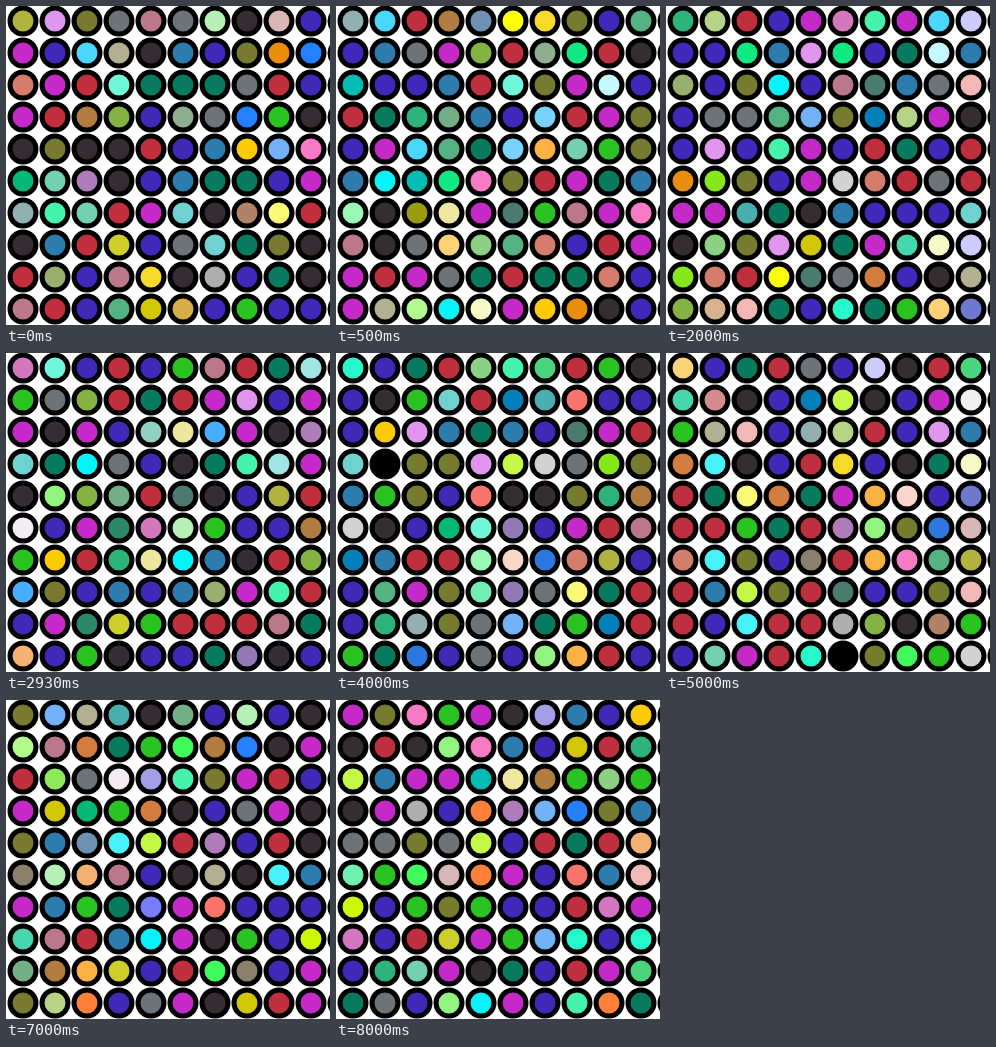
Write an HTML page that moves like this. It is 324x319 px and loops after 8500 ms.

```html
<!DOCTYPE html>
<html lang="en">
<head>
<meta charset="utf-8">
<title>Dots</title>
<style>
html, body { margin: 0; width: 100%; height: 100%; overflow: hidden; background: #fff; }
svg { display: block; width: 100vw; height: 100vh; }
circle { stroke: #000; stroke-width: 5; }
</style>
</head>
<body>
<svg id="stage" viewBox="0 0 324 319" preserveAspectRatio="none"></svg>
<script>
const LOOP = 8500, COLS = 10, ROWS = 10, PITCH = 32, RADIUS = 13;
const steps = [0, 500, 1030, 1500, 2000, 2500, 2930, 3500, 4000,
  4500, 5000, 5500, 6000, 6500, 7000, 7500, 8000];

// Frequent colours with their share of the dots in percent
const common = [
  ['#4029b8', 13], ['#c02f3d', 10], ['#c529c8', 9], ['#362d32', 8],
  ['#777a2f', 5], ['#087a5f', 5], ['#2bc322', 5], ['#6c7379', 3], ['#2c7dad', 3]
];

const rare = (
  '#4b7a70 #10e883 #f4b272 #cccdfa #9179b5 #fbfa78 #d8b6b6 #f7d929 #b7f0b6 ' +
  '#4ad8ff #c4f8fc #0480b8 #2d78df #70f0b0 #d27d3d #8b806e #2cd2c5 #48aeff ' +
  '#f2b8b8 #41fb5d #999b10 #4ad47e #288868 #78d2ff #ccf805 #ea8d0c #98f8b6 ' +
  '#2580ff #70d2d0 #ae7db9 #f97ac6 #aeaeae #26f8cc #f9746b #90f47e #b7d385 ' +
  '#73b2f8 #73d0b0 #b08268 #e095ee #b0b43f #04bab4 #8bd083 #b2b092 #d6ae49 ' +
  '#fccb05 #04abd8 #a1e5e6 #d378bf #787cf8 #46f3ad #d2c705 #b17c3f #92d0c1 ' +
  '#4aaeae #bb788b #cdce2a #eee7a0 #70f8d8 #46d6af #05f4fb #a39fe7 #6c79ce ' +
  '#d48c90 #2db47d #f0eef0 #6e90b2 #47f3fb #f7fac6 #d3d3d3 #c4f846 #86e819 ' +
  '#85b343 #fbd276 #f4ebf0 #d7b28e #8fe858 #04b877 #92afb2 #d47d6c #fdb143 ' +
  '#73ae86 #ff8039 #8fae90 #fbd7ca #53b383 #98af70 #fcff05 #b3fb8d #ff7d8d'
).split(' ');

// Solid black dots: step -> cell
const blanks = { 8: 31, 10: 95, 12: 36 };

function randomFrom(seed) {
  let a = seed;
  return () => {
    a = (a + 0x6d2b79f5) | 0;
    let t = Math.imul(a ^ (a >>> 15), 1 | a);
    t = (t + Math.imul(t ^ (t >>> 7), 61 | t)) ^ t;
    return ((t ^ (t >>> 14)) >>> 0) / 4294967296;
  };
}

function pick(rand) {
  let roll = rand() * 100;
  for (const [color, share] of common) {
    if (roll < share) return color;
    roll -= share;
  }
  return rare[Math.floor(rand() * rare.length)];
}

const stage = document.getElementById('stage');

function addDot(col, row) {
  const dot = document.createElementNS('http://www.w3.org/2000/svg', 'circle');
  dot.setAttribute('cx', 17 + col * PITCH);
  dot.setAttribute('cy', 15 + row * PITCH);
  dot.setAttribute('r', RADIUS);
  stage.appendChild(dot);
  return dot;
}

const dots = [];
for (let row = 0; row < ROWS; row++) {
  for (let col = 0; col < COLS; col++) dots.push(addDot(col, row));
  addDot(COLS, row); // only its rim reaches the stage
}

let shown = -1;
function show(step) {
  if (step === shown) return;
  shown = step;
  const rand = randomFrom(4721 + step * 7919);
  dots.forEach((dot, i) => {
    const color = pick(rand);
    dot.setAttribute('fill', blanks[step] === i ? '#000' : color);
  });
}

let start = null;
function tick(now) {
  if (start === null) start = now;
  const t = (now - start) % LOOP;
  show(steps.filter(s => s <= t).length - 1);
  requestAnimationFrame(tick);
}
show(0);
requestAnimationFrame(tick);
</script>
</body>
</html>
```
